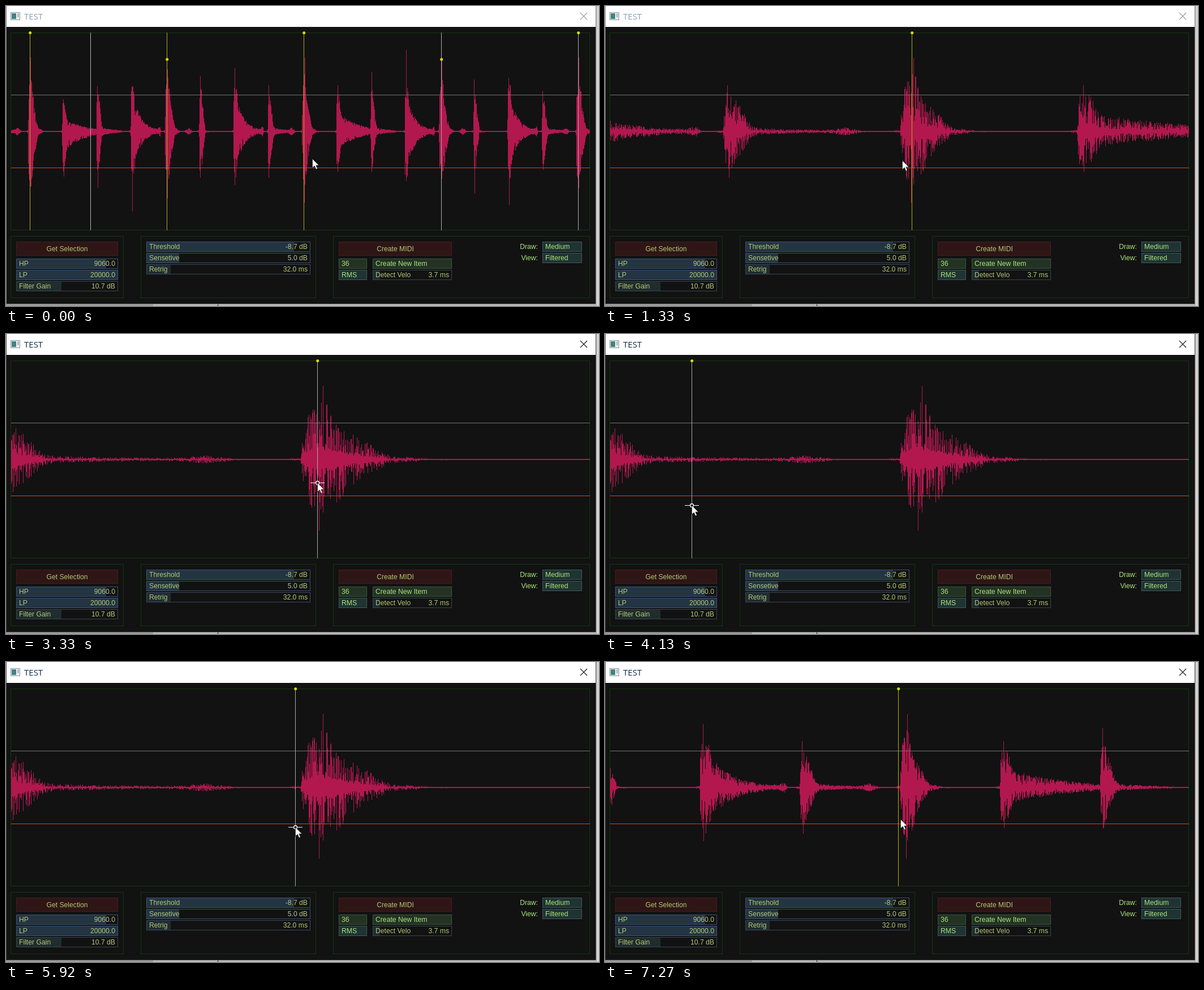
An HTML page for the animation above (8000 ms loop, 1048 by 531 pixels).

```html
<!DOCTYPE html>
<html lang="en">
<head>
<meta charset="utf-8">
<title>Transient detector</title>
<style>
  html, body { margin: 0; width: 100%; height: 100%; overflow: hidden; background: #121212; }
  svg { display: block; width: 1048px; height: 531px; }
  text { font: 12.2px "Liberation Sans", Arial, sans-serif; fill: #b3c872; white-space: pre; }
  .bright { fill: #a9e47c; }
  #title { font: 15px "Open Sans", "Noto Sans", sans-serif; }
  .crisp { shape-rendering: crispEdges; }
</style>
</head>
<body>
<svg viewBox="0 0 1048 531">
  <defs><clipPath id="plot"><rect x="9" y="40" width="1023" height="357"/></clipPath></defs>
  <g class="crisp">
    <rect width="1048" height="531" fill="#b9b9b9"/>
    <rect x="1044" width="4" height="531" fill="#d2d2d2"/>
    <rect y="528" width="260" height="3" fill="#9c9c9c"/>
    <rect x="374" y="527" width="1" height="4" fill="#222"/>
    <rect id="frame" width="1043" height="528"/>
    <rect x="1" width="1041" height="37" fill="#fff"/>
    <rect x="1" y="37" width="1041" height="490" fill="#121212"/>
    <rect x="8.5" y="11.5" width="16" height="13" fill="#f4f4f4" stroke="#8b9296"/>
    <rect x="10" y="13" width="8" height="10" fill="#3e8581"/>
    <rect x="20" y="13" width="3" height="7" fill="#aebcc0"/>
  </g>
  <text id="title" x="32" y="24">TEST</text>
  <path id="close" d="M1015 12l12 12m0-12l-12 12" fill="none" stroke-width="1.2"/>
  <g id="panels" class="crisp" fill="none" stroke="#12380f"></g>
  <g id="controls"></g>
  <g clip-path="url(#plot)">
    <path id="wave" class="crisp" fill="none" stroke="#b2184e"/>
    <g class="crisp">
      <rect x="8" y="157" width="1024" height="1" fill="#727272"/>
      <rect x="8" y="286" width="1024" height="1" fill="#cf4d08"/>
    </g>
    <g id="marks"></g>
  </g>
  <g id="cursor">
    <g id="cross"><path d="M-12 .5H13" stroke="#fff"/><circle cx=".5" cy=".5" r="3" fill="#222" stroke="#fff" stroke-width="1.3"/></g>
    <path d="M.5 .5V16.5L4.3 13L6.8 19L9.4 17.9L6.9 12.1H12Z" fill="#fff" stroke="#222" stroke-width=".8"/>
  </g>
</svg>
<script>
const $ = id => document.getElementById(id);
const LOOP = 8000, MID = 222, LEFT = 9, RIGHT = 1032;

// ---- Static controls ----
const rect = (x, y, w, h, fill, stroke) =>
  `<rect class="crisp" x="${x + .5}" y="${y + .5}" width="${w - 1}" height="${h - 1}" fill="${fill}" stroke="${stroke}"/>`;
const label = (x, y, text, anchor = 'start', cls = '') =>
  `<text x="${x}" y="${y}" text-anchor="${anchor}" class="${cls}">${text}</text>`;
const button = (x, text) => rect(x, 417, x < 500 ? 180 : 200, 25, '#2e1616', '#4c1a1c') +
  label(x + (x < 500 ? 90 : 100), 434, text, 'middle');
const slider = (x, y, w, fillWidth, name, value, fill = '#233443', edge = '#3b5473') =>
  `<rect class="crisp" x="${x}" y="${y}" width="${fillWidth}" height="18" fill="${fill}"/>` +
  rect(x, y, w, 18, 'none', edge) + label(x + 5, y + 13, name) + label(x + w - 5, y + 13, value, 'end');
const box = (x, y, w, text, fill, edge) => rect(x, y, w, 18, fill, edge) + label(x + 5, y + 13, text, 'start', 'bright');
const teal = ['#203333', '#3b5b5a'], green = ['#243224', '#365c38'];

$('panels').innerHTML = [[8, 47, 1024, 350], [8, 407, 200, 110], [238, 407, 310, 110], [578, 407, 454, 110]]
  .map(p => rect(...p, 'none', '#12380f')).join('');
$('controls').innerHTML = [
  button(18, 'Get Selection'),
  slider(18, 447, 180, 159, 'HP', '9060.0'),
  slider(18, 467, 180, 180, 'LP', '20000.0'),
  slider(18, 487, 180, 80, 'Filter Gain', '10.7 dB', '#202d2e', '#35464f'),
  slider(248, 417, 290, 261, 'Threshold', '-8.7 dB'),
  slider(248, 437, 290, 58, 'Sensetive', '5.0 dB'),
  slider(248, 457, 290, 43, 'Retrig', '32.0 ms', '#202d33', '#38495a'),
  button(588, 'Create MIDI'),
  box(588, 447, 50, '36', ...green),
  box(648, 447, 140, 'Create New Item', ...green),
  box(588, 467, 50, 'RMS', ...teal),
  slider(648, 467, 140, 13, 'Detect Velo', '3.7 ms', '#202d33', '#35464f'),
  label(940, 430, 'Draw:', 'end', 'bright'), box(948, 417, 70, 'Medium', ...teal),
  label(940, 450, 'View:', 'end', 'bright'), box(948, 437, 70, 'Filtered', ...teal)
].join('');

// ---- Audio: a drum pattern of decaying noise bursts ----
const FIRST = 39, BEAT = 60.55, DENSITY = 9, START = 8;
const drums = {
  A: { peak: [4.6, 3.8], env: [[0, 3], [1, 75], [4, 103], [6, 95], [8, 75], [10.5, 46], [14, 27], [18, 7], [26, 1.5], [61, 1]] },
  B: { peak: [2.2, 2.4], env: [[0, 3], [.7, 72], [4, 72], [6, 55], [8, 30], [20, 21], [35, 14], [61, 6]] },
  C: { peak: [1.5, 2], env: [[0, 3], [.7, 70], [3, 76], [5, 55], [7.5, 30], [9.5, 12], [12, 6], [25, 4], [50, 1], [61, 1]] },
  D: { peak: [2, 2.6], env: [[0, 3], [.7, 80], [4, 86], [6, 70], [9, 46], [16, 29], [25, 15], [40, 6], [48, 5], [51.5, 10], [53, 1], [61, 1]] }
};
const pattern = 'ABCDACDC';
const peaks = [[131, 121], [57, 80], [80, 100], [80, 141], [110, 118], [98, 82], [112, 95], [82, 82], [130, 126],
  [82, 72], [105, 72], [145, 88], [127, 104], [92, 110], [95, 130], [72, 68], [131, 120]];

let seed = 7;
const random = () => {
  seed = (seed + 0x6D2B79F5) | 0;
  let r = Math.imul(seed ^ seed >>> 15, 1 | seed);
  r ^= r + Math.imul(r ^ r >>> 7, 61 | r);
  return ((r ^ r >>> 14) >>> 0) / 4294967296;
};
const lerpPoints = (points, x) => {
  const i = Math.max(1, points.findIndex(p => p[0] >= x));
  const [x0, y0] = points[i - 1], [x1, y1] = points[i];
  return y0 + (y1 - y0) * (x - x0) / (x1 - x0);
};
function sampleAt(u) {
  const hit = Math.floor((u - FIRST) / BEAT), age = u - FIRST - hit * BEAT;
  const beat = (hit + 8) % 8, drum = drums[pattern[beat]];
  let env = lerpPoints(drum.env, age);
  if (beat === 5 && age > 10) env *= .3;
  if (beat === 4 || beat === 7) env += 5 * Math.exp(-(((age - 42) / 4) ** 2));
  if (age > BEAT - 2) env = Math.max(env, 2.5);
  return [0, 1].map(side => {
    const top = (peaks[hit] || [80, 80])[side];
    const noise = env * Math.min(1, top / 80) * (.15 + .85 * random() ** 1.6);
    const spike = Math.abs(age - drum.peak[side]) < .5 / DENSITY;
    return spike ? top : Math.min(noise, top);
  });
}
const samples = Array.from({ length: (RIGHT - START + 2) * DENSITY }, (_, i) => sampleAt(START + i / DENSITY));

function wavePath(view) {
  const index = x => Math.floor((view.toWorld(x) - START) * DENSITY);
  let d = '';
  for (let x = LEFT; x < RIGHT; x++) {
    const from = index(x), to = Math.max(from + 1, index(x + 1));
    let up = 1, down = 1;
    for (let i = from; i < to; i++) {
      const s = samples[i];
      if (s) { up = Math.max(up, s[0]); down = Math.max(down, s[1]); }
    }
    d += `M${x + .5} ${(MID - up).toFixed(1)}V${(MID + down).toFixed(1)}`;
  }
  return d;
}

// ---- Views ----
const makeView = (scale, shift) => ({
  toScreen: u => u * scale + shift,
  toWorld: x => (x - shift) / scale,
  zoom: (center, k) => makeView(scale * k, center + (shift - center) * k)
});
const zoomIn = n => makeView(1, 0).zoom(524, 1.2 ** n);
const zoomOut = n => zoomIn(12).zoom(522, .8 ** n);

// Each step changes only the listed properties; markers run a notch ahead while zooming in.
const steps = [
  { t: 0, cursor: [541, 270], view: zoomIn(0), markView: zoomIn(0), yellow: [0, 1, 2], active: false, drag: false },
  { t: 250, cursor: [533, 271] },
  { t: 500, cursor: [525, 273] },
  { t: 790, view: zoomIn(1), markView: zoomIn(2), yellow: [2] },
  { t: 1060, view: zoomIn(5), markView: zoomIn(6) },
  { t: 1330, view: zoomIn(9), markView: zoomIn(10) },
  { t: 1580, view: zoomIn(10), markView: zoomIn(11) },
  { t: 1830, view: zoomIn(11), markView: zoomIn(12) },
  { t: 2080, view: zoomIn(12), markView: zoomIn(12) },
  { t: 2330, cursor: [553, 259] },
  { t: 2580, active: true },
  { t: 2830, cursor: [551, 261] },
  { t: 3330, cursor: [550, 263], drag: true, yellow: [] },
  { t: 3600, cursor: [340, 288] },
  { t: 3850, cursor: [182, 301] },
  { t: 4130, cursor: [153, 303] },
  { t: 4400, cursor: [458, 301] },
  { t: 4670, cursor: [796, 299] },
  { t: 4920, cursor: [610, 298] },
  { t: 5170, cursor: [347, 296] },
  { t: 5420, cursor: [445, 294] },
  { t: 5670, cursor: [514, 293] },
  { t: 5920, cursor: [511, 292] },
  { t: 6440, cursor: [522, 332], drag: false },
  { t: 6730, cursor: [522, 278] },
  { t: 7000, view: zoomOut(2), markView: zoomOut(2), yellow: [2] },
  { t: 7270, view: zoomOut(5), markView: zoomOut(5) }
];
const HELD = 2, EDIT_POS = 149.5;
const marks = [[42.5, 47], [284.95, 94], [526.97, 47], [769.3, 94], [1011.5, 47]];
let state = { held: marks[HELD][0] };
const states = steps.map(step => {
  state = { ...state, ...step };
  if (state.drag) state.held = state.markView.toWorld(state.cursor[0] + .5);
  return { ...state, path: wavePath(state.view) };
});

const line = (x, color) => `<rect class="crisp" x="${x}" y="47" width="1" height="350" fill="${color}"/>`;
function draw(s) {
  $('wave').setAttribute('d', s.path);
  $('marks').innerHTML = line(Math.floor(s.view.toScreen(EDIT_POS)), '#b4b4b4') + marks.map(([u, y], i) => {
    const x = Math.floor(s.markView.toScreen(i === HELD ? s.held : u));
    return line(x, s.yellow.includes(i) ? '#b5ad08' : '#a9a9a9') +
      `<circle cx="${x + .7}" cy="${y + .5}" r="2.5" fill="#dcdc08"/>`;
  }).join('');
  $('cursor').setAttribute('transform', `translate(${s.cursor})`);
  $('cross').style.display = s.drag ? '' : 'none';
  $('title').style.fill = s.active ? '#10294a' : '#8c9eb0';
  $('close').style.stroke = s.active ? '#111' : '#999';
  $('frame').style.fill = s.active ? '#4c4c4c' : '#858585';
}

let shown;
function tick() {
  const t = performance.now() % LOOP;
  const current = states.findLast(s => s.t <= t);
  if (current !== shown) draw(shown = current);
  requestAnimationFrame(tick);
}
tick();
</script>
</body>
</html>
```
